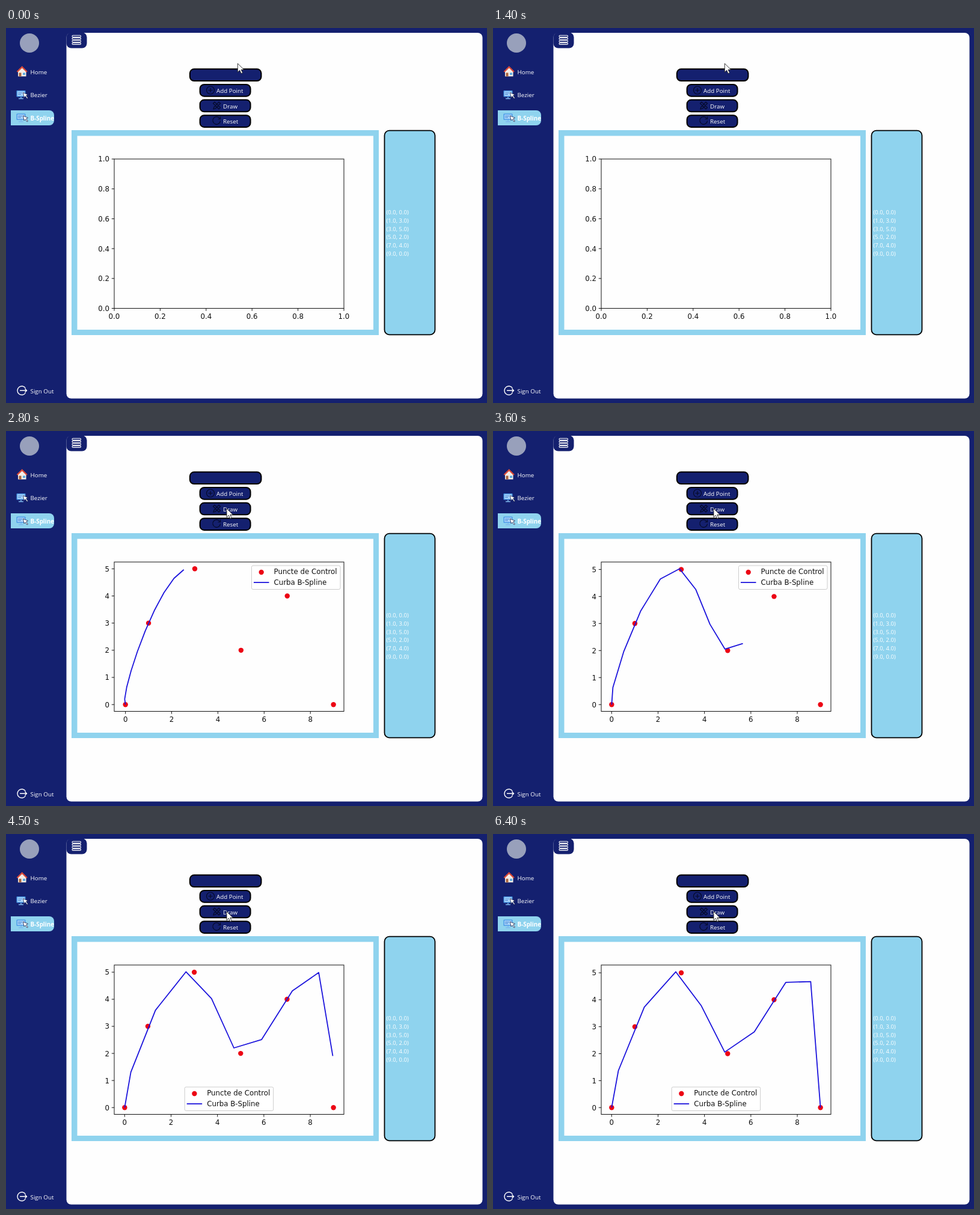
An HTML page for the animation above (6.9 s loop, 800 px wide and 624 px high).

```html
<!DOCTYPE html>
<html lang="en">
<head>
<meta charset="utf-8">
<title>B-Spline plot</title>
<style>
  html, body { margin: 0; width: 100%; height: 100%; overflow: hidden; background: #14206f; }
  svg { display: block; }
  .ui { font: 9.8px "Open Sans", "Noto Sans", sans-serif; fill: #fff; }
  .list { font-size: 9.5px; }
  .plot { font: 11.8px "DejaVu Sans", sans-serif; fill: #111; }
  .axis { fill: none; stroke: #111; stroke-width: 1; }
  .curve { fill: none; stroke: #1c14dc; stroke-width: 1.8; stroke-linejoin: round; }
  .dot { fill: #ec0414; }
  .icon { fill: none; stroke: #050a28; stroke-width: 1.2; }
</style>
</head>
<body>
<svg width="800" height="624" viewBox="0 0 800 624">
  <defs>
    <g id="screen">
      <rect x="17.5" y="104" width="15" height="10.5" rx="1" fill="#4d9be8"/>
      <rect x="19" y="105.5" width="12" height="7.5" fill="#a9d4fa"/>
      <path d="M20 108h7M20 110.500h5" stroke="#3f7fd0"/>
      <path d="M21 117.500h8M25 114.500v3" stroke="#7fb9ef" stroke-width="1.5"/>
      <path d="M28.500 107.500l8 3.500-3 1.500 3 4-1.500 1-3-4-2 2z" fill="#fff" stroke="#18204c" stroke-width=".8"/>
    </g>
    <clipPath id="tab"><rect x="8" y="137" width="72.500" height="25"/></clipPath>
  </defs>

  <rect width="800" height="624" fill="#14206f"/>
  <rect x="100.500" y="8" width="692" height="608.500" rx="8" fill="#fefefe"/>
  <rect x="100.500" y="7.500" width="34" height="26" rx="8" fill="#14206f"/>
  <g fill="none" stroke="#fff" stroke-width="1.100">
    <rect x="110" y="12.300" width="14.500" height="2.800" rx="1.400"/>
    <rect x="110" y="16.400" width="14.500" height="2.800" rx="1.400"/>
    <rect x="110" y="20.500" width="14.500" height="2.800" rx="1.400"/>
    <rect x="110" y="24.600" width="14.500" height="2.800" rx="1.400"/>
  </g>

  <circle cx="39" cy="25" r="16" fill="#98a0bb"/>
  <path d="M20 72v8.500h13.500V72l-6.800-6z" fill="#f4eee8"/>
  <path d="M18.500 73l8.200-8 8.200 8" fill="none" stroke="#dc4a38" stroke-width="2.400"/>
  <rect x="21.500" y="74.500" width="4" height="6" fill="#a9643c"/>
  <rect x="28" y="74.500" width="4" height="3.500" fill="#58a9e0"/>
  <use href="#screen"/>
  <path d="M8 137H72a8 8 0 0 1 8 8v9a8 8 0 0 1-8 8H8z" fill="#8fd3ee"/>
  <use href="#screen" y="38.500"/>
  <g fill="none" stroke="#fff" stroke-width="1.400">
    <path d="M32.500 599.500a7.300 7.300 0 1 0 0 7.500M23 603.300h11.500M31.500 600.300l3 3-3 3"/>
  </g>
  <g class="ui">
    <text x="40.500" y="76.800">Home</text>
    <text x="40.500" y="115.300">Bezier</text>
    <text x="40.500" y="153.800" font-weight="bold" clip-path="url(#tab)">B-Spline</text>
    <text x="40.500" y="607.800">Sign Out</text>
  </g>

  <g fill="#14206f" stroke="#000" stroke-width="2">
    <rect x="305.800" y="68.300" width="118.700" height="19.700" rx="7"/>
    <rect x="322.600" y="94" width="84" height="19.700" rx="7"/>
    <rect x="322.600" y="119.600" width="84" height="19.700" rx="7"/>
    <rect x="322.600" y="145.200" width="84" height="19.700" rx="7"/>
  </g>
  <g class="icon">
    <circle cx="340" cy="103.500" r="6.500"/>
    <path d="M336.500 103.500h7M340 100v7"/>
    <path d="M344.500 125.500l2.500-2.500 9.500 9.500-2.500 2.500zM345 135l1-3.500 8-8.500 2.500 2.500-8 8.500z"/>
    <path d="M355.500 150.500a6.300 6.300 0 1 0 1 4M356.500 147.500v4h-4"/>
  </g>
  <g class="ui">
    <text x="350" y="108">Add Point</text>
    <text x="361" y="133.600">Draw</text>
    <text x="361" y="159.300">Reset</text>
  </g>

  <rect x="109" y="170" width="511" height="341" fill="#8fd3ee"/>
  <rect x="118.500" y="179.500" width="492.500" height="322.500" fill="#fefefe"/>
  <rect x="629.500" y="170.700" width="84" height="339.600" rx="8" fill="#8fd3ee" stroke="#000" stroke-width="1.800"/>
  <g class="ui list" id="list"></g>

  <g class="plot">
    <g id="ticks"></g>
    <g id="dots" class="dot"></g>
    <polyline id="curve" class="curve"/>
    <rect class="axis" x="180" y="218" width="382" height="248.500"/>
    <g id="legend">
      <rect x="408.500" y="224" width="147.500" height="39.500" rx="2.400" fill="#fff" fill-opacity=".8" stroke="#ccc"/>
      <circle class="dot" cx="424.700" cy="235" r="4.200"/>
      <path class="curve" d="M412 252h25.500"/>
      <text x="445.500" y="238.300">Puncte de Control</text>
      <text x="445.500" y="256">Curba B-Spline</text>
    </g>
  </g>

  <path id="cursor" d="M0 0v14.500l3.400-3.200 2.400 5.400 2.500-1.100-2.400-5.200h4.600z" fill="#fff" stroke="#222" stroke-width=".9"/>
</svg>
<script>
const $ = id => document.getElementById(id);
const points = [[0, 0], [1, 3], [3, 5], [5, 2], [7, 4], [9, 0]];
const LOOP = 6900, STEP = 100, DRAW_AT = 2000, LAST = 99;
const axes = { left: 180, right: 562, top: 218, bottom: 466.5 };

$('list').innerHTML = points.map(([x, y], i) =>
  `<text x="632.5" y="${310.3 + i * 13.7}">(${x.toFixed(1)}, ${y.toFixed(1)})</text>`).join('');

// Interpolating cubic spline over chord length, with not-a-knot ends.
const params = [0];
for (let i = 1; i < points.length; i++)
  params.push(params[i - 1] + Math.hypot(points[i][0] - points[i - 1][0], points[i][1] - points[i - 1][1]));
const total = params[5];
params.forEach((p, i) => params[i] = p / total);
const cube = v => Math.max(0, v) ** 3;
const basis = u => [1, u, u * u, u ** 3, cube(u - params[2]), cube(u - params[3])];

function solve(rows) {
  rows.forEach((pivot, i) => {
    const lead = pivot[i];
    pivot.forEach((v, k) => pivot[k] = v / lead);
    rows.forEach((row, j) => {
      const factor = row[i];
      if (j !== i) row.forEach((v, k) => row[k] = v - factor * pivot[k]);
    });
  });
  return rows.map(row => row.slice(rows.length));
}
const coefs = solve(points.map((p, i) => [...basis(params[i]), ...p]));
const splineAt = u => {
  const b = basis(u);
  return [0, 1].map(axis => b.reduce((sum, v, k) => sum + v * coefs[k][axis], 0));
};

const limits = values => {
  const min = Math.min(...values), max = Math.max(...values), margin = (max - min) * .05;
  return [min - margin, max + margin];
};
const scale = ([min, max], from, to) => v => from + (v - min) / (max - min) * (to - from);

function drawTicks(sx, sy, xs, ys, digits) {
  const xTick = v => `<path class="axis" d="M${sx(v)} ${axes.bottom}v4.2"/>
    <text x="${sx(v)}" y="484.3" text-anchor="middle">${v.toFixed(digits)}</text>`;
  const yTick = v => `<path class="axis" d="M${axes.left} ${sy(v)}h-4.2"/>
    <text x="172" y="${sy(v) + 4.4}" text-anchor="end">${v.toFixed(digits)}</text>`;
  $('ticks').innerHTML = xs.map(xTick).join('') + ys.map(yTick).join('');
}

function drawPlot(time) {
  const shown = time >= DRAW_AT;
  for (const id of ['dots', 'curve', 'legend']) $(id).style.display = shown ? '' : 'none';
  const tenths = [0, .2, .4, .6, .8, 1];
  let samples = [], xLim = [0, 1], yLim = [0, 1];
  if (shown) {
    const held = time >= 4700 ? LAST : Math.min(96, Math.floor((time - DRAW_AT) / STEP * 3.875));
    samples = Array.from({ length: 10 }, (_, i) => splineAt(held / LAST * i / 9));
    const all = [...points, ...samples];
    xLim = limits(all.map(p => p[0]));
    yLim = limits(all.map(p => p[1]));
  }
  const sx = scale(xLim, axes.left, axes.right), sy = scale(yLim, axes.bottom, axes.top);
  if (!shown) return drawTicks(sx, sy, tenths, tenths, 1);

  drawTicks(sx, sy, [0, 2, 4, 6, 8], [0, 1, 2, 3, 4, 5], 0);
  $('dots').innerHTML = points.map(([x, y]) => `<circle cx="${sx(x)}" cy="${sy(y)}" r="4.2"/>`).join('');
  const path = samples.map(([x, y]) => [sx(x), sy(y)]);
  $('curve').setAttribute('points', path.join(' '));
  // The legend gives way once the curve reaches its corner.
  const blocked = path.some(([x, y]) => x > 408 && y < 264);
  $('legend').setAttribute('transform', blocked ? 'translate(-111.3 197)' : '');
}

function drawCursor(time) {
  const k = Math.min(1, Math.max(0, (time - 1600) / 300));
  const ease = k * k * (3 - 2 * k);
  $('cursor').setAttribute('transform', `translate(${385.3 - 18.3 * ease} ${59 + 70 * ease})`);
}

let lastTime = -1;
function frame(now) {
  const time = Math.floor(now % LOOP / STEP) * STEP;
  if (time !== lastTime) {
    drawPlot(time);
    drawCursor(time);
    lastTime = time;
  }
  requestAnimationFrame(frame);
}
frame(performance.now());
</script>
</body>
</html>
```
